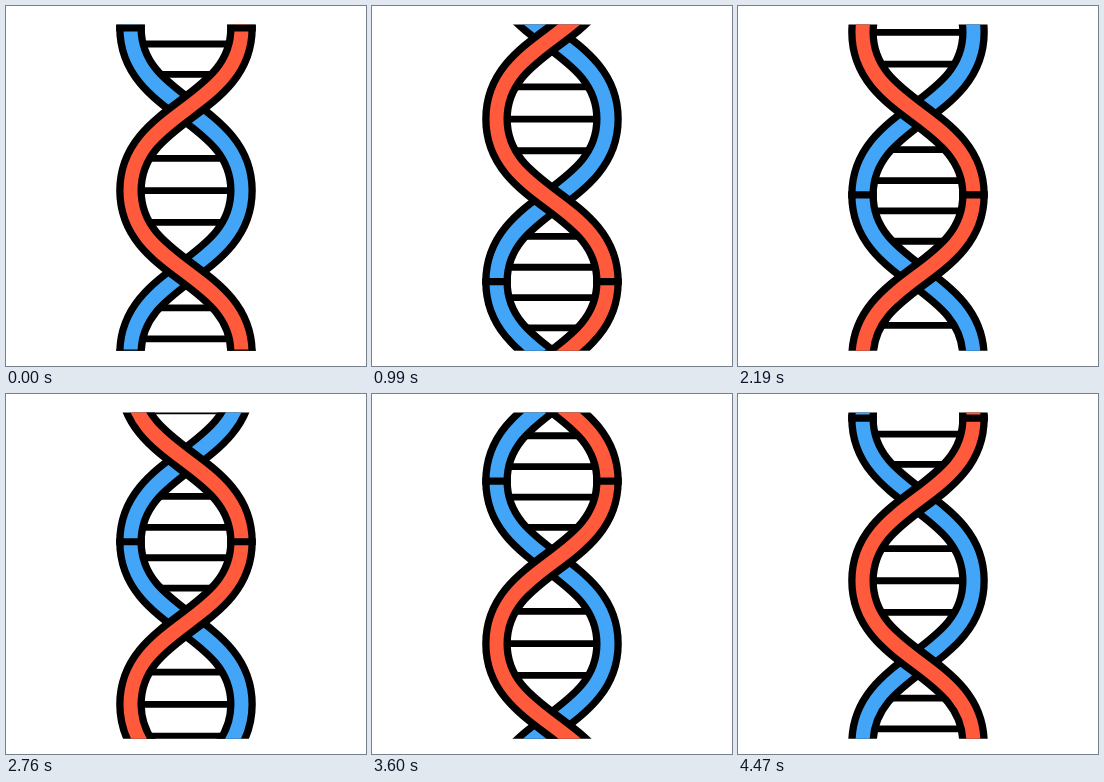
An HTML page for the animation above (4.5 s loop, 360x360 px).

```html
<!DOCTYPE html>
<html lang="en">
<head>
<meta charset="utf-8">
<title>DNA helix</title>
<style>
  html, body { margin: 0; width: 100%; height: 100%; overflow: hidden; background: #fff; }
  svg { display: block; width: 100vw; height: 100vh; }
</style>
</head>
<body>
<svg viewBox="0 0 360 360">
  <defs>
    <clipPath id="view"><rect x="100" y="18.5" width="160" height="326.3"/></clipPath>
  </defs>
  <g clip-path="url(#view)"><g id="helix" fill="none"></g></g>
</svg>
<script>
  const LOOP = 4500, STEP = 30;
  const TURN = 325.2, HALF = TURN / 2;   // height of a full and a half twist
  const TOP = 22, MID = 180, AMP = 55.5, BEND = 80;
  const RED = '#ff5a3c', BLUE = '#42a5f8', INK = '#000';
  const BAND = 28.6, FILL = 14, RUNG = 6.8, SEAM = 7.2;   // line widths
  // height and half length of each rung in one twist
  const RUNGS = [[38, 50], [68.3, 30], [152.4, 40], [184.6, 50], [216.3, 40], [301.9, 30], [332.8, 50]];

  const helix = document.getElementById('helix');

  function addPath(d, color, width) {
    const path = document.createElementNS('http://www.w3.org/2000/svg', 'path');
    path.setAttribute('d', d);
    path.setAttribute('stroke', color);
    path.setAttribute('stroke-width', width);
    helix.appendChild(path);
  }

  // side is -1 when the strand is on the left at TOP
  function strand(side) {
    const x = k => MID + AMP * side * (k % 2 ? -1 : 1);
    const y = k => TOP + k * HALF;
    let d = `M${x(-1)} ${y(-1)}`;
    for (let k = -1; k < 5; k++) {
      d += `C${x(k)} ${y(k) + BEND} ${x(k + 1)} ${y(k + 1) - BEND} ${x(k + 1)} ${y(k + 1)}`;
    }
    return d;
  }

  function addStrand(side, color) {
    const d = strand(side);
    addPath(d, INK, BAND);
    addPath(d, color, FILL);
  }

  const bar = (x, y, half) => `M${x - half} ${y}h${half * 2}`;
  let rungs = '', seams = '';
  for (let turn = 0; turn < 3; turn++) {
    const dy = turn * TURN;
    for (const [y, half] of RUNGS) rungs += bar(MID, y + dy, half);
    for (const side of [-1, 1]) seams += bar(MID + side * AMP, TOP + dy, BAND / 2);
  }

  addPath(rungs, INK, RUNG);
  addStrand(-1, BLUE);
  addStrand(1, RED);
  addPath(seams, INK, SEAM);

  function draw(ms) {
    const t = Math.floor((ms % LOOP) / STEP) * STEP;
    helix.setAttribute('transform', `translate(0 ${-TURN * t / LOOP})`);
  }

  const start = performance.now();
  function tick() {
    draw(performance.now() - start);
    requestAnimationFrame(tick);
  }
  draw(0);
  requestAnimationFrame(tick);
</script>
</body>
</html>
```
